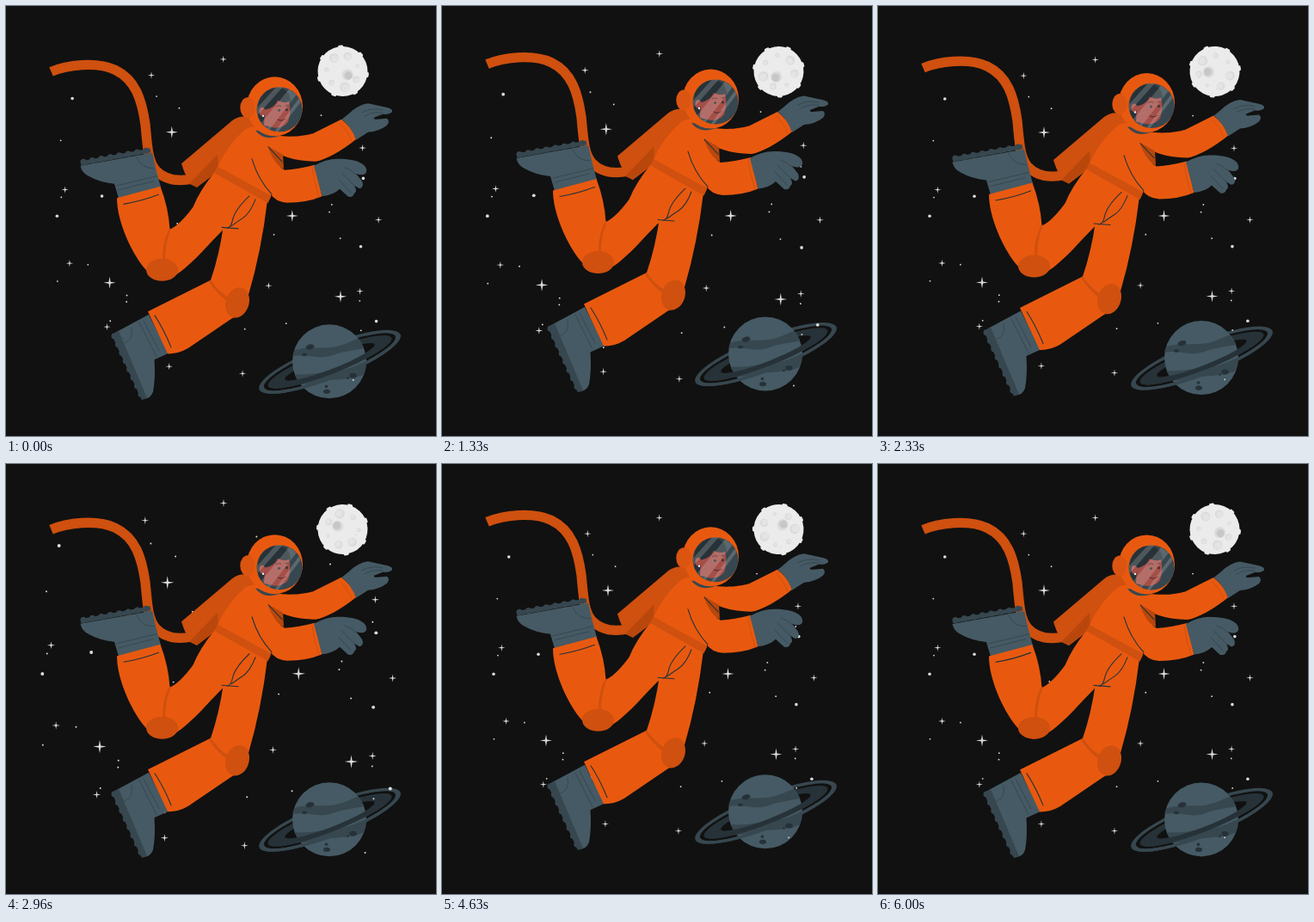
An HTML page that plays this animation: 500 by 500 pixels, repeating every 6.04 s.

```html
<!DOCTYPE html>
<html lang="en">
<head>
<meta charset="utf-8">
<title>Floating astronaut</title>
<style>
  html, body { margin: 0; width: 100%; height: 100%; overflow: hidden; background: #111; }
  svg { display: block; width: 100%; height: 100%; }
  .suit { fill: #e8590f; }
  .shade { fill: #cf500f; }
  .deep { fill: #b9470c; }
  .grey { fill: #455a64; }
  .slate { fill: #37474f; }
  .ink { fill: #263238; }
  .skin { fill: #a44f48; }
  .line { fill: none; stroke: #263238; stroke-width: 1.1; stroke-linecap: round; }
  .fold { fill: none; stroke: #37474f; stroke-width: 1; stroke-linecap: round; }
  .seam { fill: none; stroke: #cf500f; stroke-width: 1; stroke-linecap: round; }
  .sole { fill: none; stroke: #37474f; stroke-width: 5; }
  .tread { fill: none; stroke: #37474f; stroke-width: 7; stroke-linecap: round; stroke-dasharray: 0 10.6; }
</style>
</head>
<body>
<svg viewBox="0 0 500 500">
  <defs>
    <clipPath id="globe"><circle cx="376" cy="413.5" r="43"/></clipPath>
    <clipPath id="visor"><ellipse cx="318" cy="120.500" rx="26" ry="26"/></clipPath>
    <clipPath id="frontHalf"><rect x="-95" width="190" height="40"/></clipPath>
    <g id="rings" fill-rule="evenodd"></g>
  </defs>
  <rect width="500" height="500" fill="#111"/>

  <g id="planet">
    <use href="#rings" transform="translate(376.5 414) rotate(-21.3)"/>
    <circle class="grey" cx="376" cy="413.5" r="43"/>
    <g clip-path="url(#globe)">
      <path class="slate" d="M330 408C350 403 360 412 378 407C398 399 408 402 422 396V384C404 386 398 394 380 397C362 399 350 395 330 402Z"/>
      <path class="slate" d="M330 428C355 431 372 424 390 423C404 421 410 416 422 412V426C408 433 396 434 380 435C362 436 350 443 330 440Z"/>
    </g>
    <g class="ink">
      <ellipse cx="353.5" cy="396.5" rx="5" ry="3" transform="rotate(-15 353.5 396.5)"/>
      <ellipse cx="347" cy="405.5" rx="3" ry="1.8"/>
      <ellipse cx="403.5" cy="430" rx="4.3" ry="3"/>
      <ellipse cx="373" cy="448.5" rx="4" ry="2.6"/>
      <circle cx="372.5" cy="442.5" r="1.8"/>
      <circle cx="397.5" cy="433" r="1.3"/>
    </g>
    <g transform="translate(376.5 414) rotate(-21.3)">
      <use href="#rings" clip-path="url(#frontHalf)"/>
    </g>
  </g>

  <g id="moon"><circle cx="391.5" cy="76" r="29" fill="#ebebeb"/></g>
  <g id="stars" fill="#dcdcdc"></g>

  <g id="astronaut">
    <path d="M52.500 76.500C70 69 105 64 127 74.500C151 86 158 110 162 138C164.500 164 165 180 174 191C184 202 198 205 217 201" fill="none" stroke="#cf500f" stroke-width="11.3"/>

    <!-- backpack -->
    <path class="shade" d="M204 183.500L263 133.500Q273 126 284 130L296 142L247 192L222 211Q211 207 204 183.500Z"/>
    <path class="deep" d="M213 207L246 173L247 192L222 211Z"/>

    <!-- far arm -->
    <path class="suit" d="M312 150C330 154 348 151 357 148.500L390 132Q401 140 408 154.500C390 169 372 179 360 181C345 181 325 178 306 167Z"/>
    <path class="seam" d="M389 137Q397 145 402 157"/>
    <path class="grey" d="M390.500 132L398 126Q409 115 421 113.500L444 118.500Q450 120 449 123.500Q446 126.500 438 126L428 130Q427 132 431 132L443 131Q447 134 443 139Q434 146 421 147L407 156Q402 141 390.500 132Z"/>
    <path class="fold" d="M414 124Q424 118 438 121M417 128Q428 122 438 124.500"/>

    <!-- far boot and leg -->
    <path class="sole" d="M87 183L168 168"/>
    <path class="tread" d="M90 181.500L168 167.500"/>
    <path class="grey" d="M86.500 186L170 171Q174 190 180 211L131 224L126 207Q108 205 96 198Q88 194 86.500 186Z"/>
    <path class="fold" d="M152 176Q157 189 172 189M129 209L175 198M131 214L171 204"/>
    <path class="suit" d="M243 193Q225 215 217.500 234Q202 255 190.500 260Q189 235 179.500 210L129 223.500C129 250 145 285 160 304Q172 319 190 317.500C215 304 235 277 254 259L304 229Z"/>
    <path class="shade" d="M190.500 258Q181 275 182 297L185 297Q185 276 191 262Z"/>
    <ellipse class="shade" cx="181.500" cy="307" rx="18.500" ry="13"/>
    <path class="line" d="M137 230.500Q158 227 177.500 219.500"/>

    <!-- near boot and leg -->
    <path class="sole" d="M125.500 382L160 457"/>
    <path class="tread" d="M126 384L159 456"/>
    <path class="grey" d="M127 380L166 359L189 404L172.500 411.500Q174 433 171 449Q168 457 160 457Z"/>
    <path class="slate" d="M126 380.500L131 378L164 456L159 458Z"/>
    <path class="fold" d="M146 374Q149 388 138 392M155 368L175 408M160 366L178 401"/>
    <path class="suit" d="M253 255Q248 290 238 319L165 355.500L188 404.500Q200 405 212 398L262 364Q278 356 282 336Q297 285 304 226L262 205L243 193Z"/>
    <path class="shade" d="M238 318.500Q246 331 258 339L255 342Q244 333 236 321Z"/>
    <ellipse class="shade" cx="269" cy="345" rx="13.500" ry="18" transform="rotate(18 269 345)"/>
    <path class="line" d="M173 360Q184 377 192 397"/>

    <!-- torso -->
    <path class="suit" d="M243 194L246 187Q258 161 278 144Q288 137 298 144L319 155L322 180L306 226Z"/>
    <path class="deep" d="M304 163L322 173L323 190L310 182Z"/>
    <path class="line" d="M305 164L321 181"/>
    <path class="shade" d="M246 187L308.500 221L304.500 229.500L242 194Z"/>
    <path class="line" d="M283 221Q266 237 263.500 249Q262 257 257 258.500M290 225Q284 241 275 247T262 256M251 257.500L270 259"/>

    <!-- near arm -->
    <path class="suit" d="M286 176L304 163Q312 185 324 191Q340 190 359 185L367.500 221.500Q350 229 327 229Q313 228 307 218Q292 202 286 176Z"/>
    <path class="line" d="M286 178Q293 202 309 219"/>
    <path class="seam" d="M356 188Q358 205 364 222"/>
    <path class="grey" d="M358 186Q374 177 388 178C399 178 411 180 417 186Q421 192 418 195Q414 198 407 195L414 204Q417 211 411 212.500L405 209Q409 216 405 218Q404 223 398 222L388 213Q381 220 367.500 221.500Z"/>
    <path class="fold" d="M394 188Q402 191 407 196M390 194L405 209M387 202L401 217"/>

    <!-- helmet -->
    <path class="slate" d="M290 145Q300 158 319 151L316 146Z"/>
    <ellipse class="suit" cx="312.500" cy="117" rx="32.500" ry="34.500"/>
    <ellipse cx="281" cy="118.500" rx="8.700" ry="12" fill="#dc5510"/>
    <ellipse class="slate" cx="318" cy="120.500" rx="26.500" ry="26"/>
    <g clip-path="url(#visor)">
      <path class="ink" d="M293 135Q289 97 313 95Q329 95 331 110L326 122L303 143Z"/>
      <path class="skin" d="M301 121Q312 119 316 110Q324 114 329 111Q332 123 328 135Q323 142 313 142L300 139Z"/>
      <ellipse class="skin" cx="298" cy="123" rx="3.500" ry="5"/>
      <circle cx="299" cy="128" r="1.200" fill="#eee"/>
      <path d="M314 117Q317 114.500 320 116.500M325 116L328 115.500M316 132Q320 135 325 131.500" fill="none" stroke="#4c2426" stroke-linecap="round"/>
      <circle class="ink" cx="317.500" cy="121.500" r="1.500"/>
      <circle class="ink" cx="326.500" cy="121" r="1.400"/>
      <g fill="#fff" opacity=".18">
        <path d="M317 91L323 93L292 128L289 122Z"/>
        <path d="M329 97L338 103L305 146L296 137Z"/>
        <path d="M341 107L344 110L316 147L312 147Z"/>
      </g>
    </g>
  </g>
</svg>
<script>
const LOOP = 6040, CYCLE = 6000, TAU = 2 * Math.PI;
const byId = id => document.getElementById(id);

function add(parent, tag, attrs) {
  const node = document.createElementNS('http://www.w3.org/2000/svg', tag);
  for (const key in attrs) node.setAttribute(key, attrs[key]);
  parent.appendChild(node);
}

const around = (cx, cy, radius, degrees) => {
  const a = degrees * TAU / 360;
  return [cx + radius * Math.cos(a), cy + radius * Math.sin(a)];
};

const oval = (rx, ry) => `M${-rx} 0A${rx} ${ry} 0 0 1 ${rx} 0A${rx} ${ry} 0 0 1 ${-rx} 0Z`;
add(byId('rings'), 'path', { d: oval(88, 20) + oval(82, 16.5), fill: '#37474f' });
add(byId('rings'), 'path', { d: oval(77, 14) + oval(56, 8.5), fill: '#263238' });

// Moon: one large crater, a ring of smaller ones, and bumps along the rim.
const MOON = [391.5, 76], KNOBS = 7;
function crater([cx, cy], r, floor) {
  add(byId('moon'), 'circle', { cx, cy, r, fill: '#dbdbdb' });
  add(byId('moon'), 'circle', { cx: cx + r * .12, cy: cy + r * .12, r: r * .7, fill: floor });
}
crater(around(...MOON, 7, 34), 6.5, '#c7c7c7');
for (let i = 0; i < KNOBS; i++) {
  const angle = 30 + i * 360 / KNOBS;
  crater(around(...MOON, 18.5, angle), 4 + 1.8 * Math.cos(2 * (angle - 255) * TAU / 360), '#e4e4e4');
  add(byId('moon'), 'rect', {
    x: 388.5, y: 45.5, width: 6, height: 4, rx: 1.5, fill: '#ebebeb',
    transform: `rotate(${i * 360 / KNOBS - 6} ${MOON})`
  });
}

// Stars: four bright sparkles, a wide ring of small ones, and scattered dots.
const CENTER = [249.5, 245.5];
const stars = byId('stars');
function sparkle([x, y], size) {
  add(stars, 'path', {
    d: 'M0-1L.15-.15L1 0L.15 .15L0 1L-.15 .15L-1 0L-.15-.15Z',
    transform: `translate(${x} ${y}) scale(${size})`
  });
}
for (const point of [[193, 147], [121, 321.5], [388.5, 337.5], [332.5, 244]]) sparkle(point, 7);
for (let i = 0; i < 12; i++) sparkle(around(...CENTER, i % 6 === 3 ? 97 : 183, 27 * i - 26), 4.2);

let seed = 11;
const random = () => (seed = seed * 16807 % 2147483647) / 2147483647;
for (let i = 0; i < 40; i++) {
  add(stars, 'circle', {
    cx: 60 + 370 * random(), cy: 90 + 345 * random(), r: i % 6 ? .9 : 1.8
  });
}

// Linear interpolation through [position, value] stops.
function track(stops, p) {
  const i = Math.max(1, stops.findIndex(stop => p <= stop[0]));
  const [p0, v0] = stops[i - 1], [p1, v1] = stops[i];
  return v0 + (v1 - v0) * (p - p0) / (p1 - p0);
}
const heartbeat = [[0, 1], [.1, 1.1], [.3, 1], [.4, 1], [.5, 1.1], [.6, 1], [1, 1]];
const floating = [[0, 0], [.5, -10], [1, 0]];

function render(ms) {
  const turn = ((ms % LOOP) / LOOP + 20 / CYCLE) % 1;
  const lift = track(floating, (turn * 2) % 1);
  for (const id of ['astronaut', 'planet']) byId(id).setAttribute('transform', `translate(0 ${lift})`);
  byId('moon').setAttribute('transform', `rotate(${turn * 360} ${MOON})`);
  const scale = track(heartbeat, turn);
  const [x, y] = CENTER;
  stars.setAttribute('transform', `translate(${x} ${y}) scale(${scale}) translate(${-x} ${-y})`);
}

const start = performance.now();
function tick() {
  render(performance.now() - start);
  requestAnimationFrame(tick);
}
tick();
</script>
</body>
</html>
```
